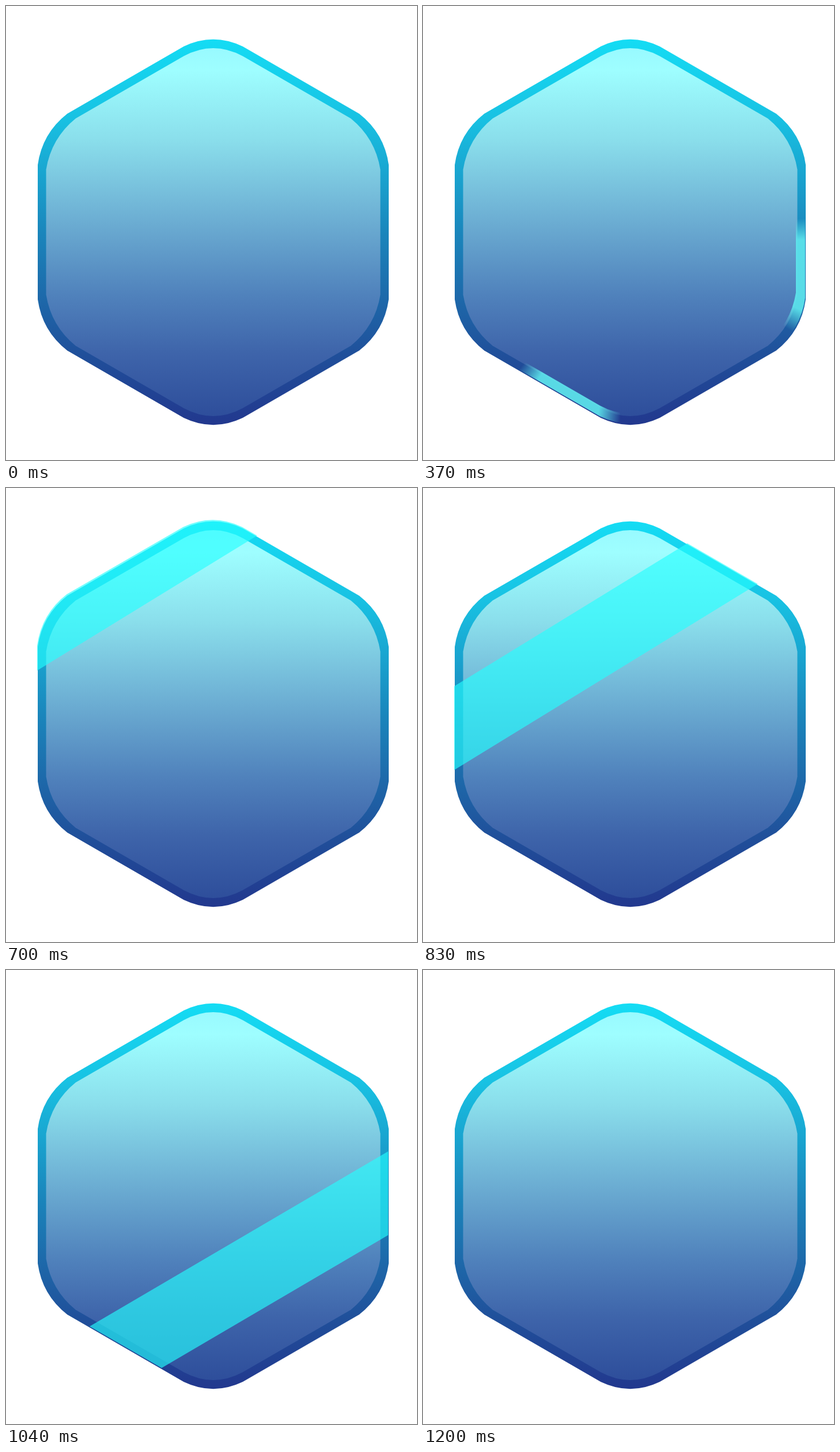
These frames come from a looping animation (712x786 px, 1240 ms). An HTML page with a canvas:

```html
<!DOCTYPE html>
<html lang="en">
<head>
<meta charset="utf-8">
<title>Shining hexagon badge</title>
<style>
  html, body { margin: 0; width: 100%; height: 100%; overflow: hidden; background: #fff; }
  canvas { display: block; }
</style>
</head>
<body>
<canvas id="stage" width="712" height="786"></canvas>
<script>
const ctx = document.getElementById('stage').getContext('2d');
const W = 712, H = 786, CX = 359, CY = 391.5;
const LOOP = 1240;
const RAD = Math.PI / 180;

// Moments when each effect moves on; the last one ends it.
const GLINT_TIMES = [80, 160, 240, 370, 450, 530];
const BAND_TIMES = [700, 830, 910, 1040, 1120, 1200];

const mix = (a, b, f) => a.map((v, i) => v + (b[i] - v) * f);

// Regular hexagon, point up; each corner is cut off and bulges back towards its vertex.
function hexagon(apothem, poleBulge, sideBulge, dx = 0, dy = 0) {
  const side = apothem / Math.cos(30 * RAD);
  const cut = 59 / side;
  const vertex = i => [
    CX + dx + side * Math.sin(i * 60 * RAD),
    CY + dy - side * Math.cos(i * 60 * RAD)
  ];
  const path = new Path2D();
  for (let i = 0; i < 6; i++) {
    const tip = vertex(i);
    const from = mix(tip, vertex(i - 1), cut);
    const to = mix(tip, vertex(i + 1), cut);
    const control = mix(mix(from, to, 0.5), tip, i % 3 ? sideBulge : poleBulge);
    path.lineTo(...from);
    path.quadraticCurveTo(...control, ...to);
  }
  path.closePath();
  return path;
}

function vertical(y0, y1, stops) {
  const g = ctx.createLinearGradient(0, y0, 0, y1);
  for (const [at, color] of stops) g.addColorStop(at, color);
  return g;
}

const outer = hexagon(304, 0.83, 0.7);
const inner = hexagon(289.5, 0.93, 0.66);

// Highlights sit slightly up and left of the badge.
const cover = hexagon(304, 0.83, 0.7, -1, -2.5);
const ring = new Path2D(cover);
ring.addPath(hexagon(288, 0.93, 0.66, -1, -2.5));

const rimFill = vertical(58, 725, [
  [0, '#14dcf4'], [0.2, '#18c2e3'], [0.5, '#1a86bc'], [0.82, '#204f9a'], [1, '#22388e']
]);
const faceFill = vertical(73, 710, [
  [0, '#98faff'], [0.06, '#9efeff'], [0.25, '#8adeeb'], [0.44, '#70b4d6'],
  [0.67, '#5082bc'], [0.83, '#3e64aa'], [1, '#2e4e9b']
]);

// Index of the running step, or -1 when the effect is off.
function stepOf(times, t) {
  const n = times.filter(start => start <= t).length;
  return n < times.length ? n - 1 : -1;
}

// A soft-ended arc of light on the rim, centred at an angle in degrees.
function drawGlint(angle, fade) {
  const span = 36;
  const g = ctx.createConicGradient((angle - span / 2) * RAD, CX, CY);
  const clear = 'rgba(94,231,237,0)', bright = 'rgba(94,231,237,.91)';
  g.addColorStop(0, clear);
  g.addColorStop(fade / 360, bright);
  g.addColorStop((span - fade) / 360, bright);
  g.addColorStop(span / 360, clear);
  ctx.fillStyle = g;
  ctx.fill(ring, 'evenodd');
}

function drawGlints(k) {
  const fade = 2.5 + 1.5 * k;
  drawGlint(-94.5 + 36 * k, fade);
  drawGlint(204 - 31 * k, fade);
}

// A slanted band of light that slows a little as it crosses the badge.
function drawBand(k) {
  const height = 145;
  const y = -16 + 174 * k - 1.6 * k * k;
  const slope = k < 3 ? 0.613 : 0.586;
  const left = y + slope * CX, right = y - slope * (W - CX);
  ctx.save();
  ctx.clip(cover);
  ctx.beginPath();
  ctx.moveTo(0, left);
  ctx.lineTo(W, right);
  ctx.lineTo(W, right + height);
  ctx.lineTo(0, left + height);
  ctx.fillStyle = 'rgba(36,255,255,.64)';
  ctx.fill();
  ctx.restore();
}

function draw(t) {
  ctx.fillStyle = '#fff';
  ctx.fillRect(0, 0, W, H);
  ctx.fillStyle = rimFill;
  ctx.fill(outer);
  ctx.fillStyle = faceFill;
  ctx.fill(inner);
  const glint = stepOf(GLINT_TIMES, t);
  const band = stepOf(BAND_TIMES, t);
  if (glint >= 0) drawGlints(glint);
  if (band >= 0) drawBand(band);
}

const start = performance.now();
function tick() {
  draw((performance.now() - start) % LOOP);
  requestAnimationFrame(tick);
}
tick();
</script>
</body>
</html>
```
